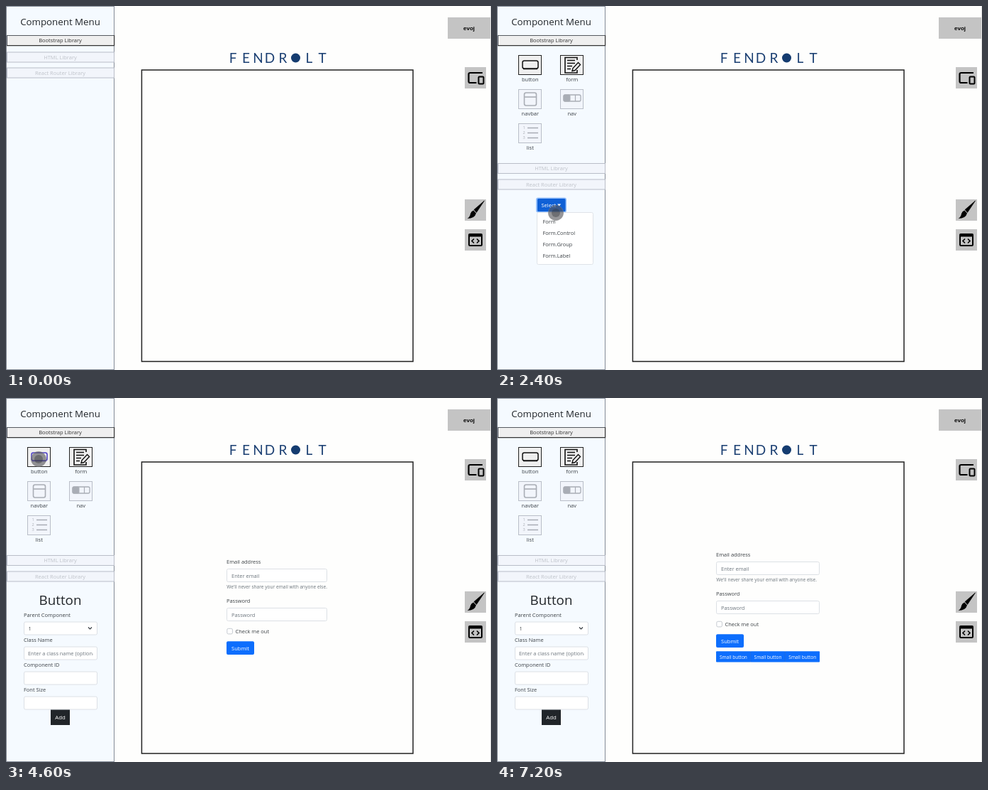
These frames come from a looping animation (684 by 512 pixels, 8 s). An HTML page:

```html
<!DOCTYPE html>
<html lang="en">
<head>
<meta charset="utf-8">
<title>Component builder</title>
<style>
  html, body { margin: 0; width: 100%; height: 100%; overflow: hidden; background: #fefefd; }
  svg { display: block; width: 684px; height: 512px; }
  text { font-family: "Open Sans", "Noto Sans", sans-serif; white-space: pre; }
</style>
</head>
<body>
<svg id="stage" viewBox="0 0 684 512" xmlns="http://www.w3.org/2000/svg">
  <defs><clipPath id="field"><rect x="26" y="349" width="96.5" height="19"/></clipPath></defs>
  <g id="fixed"></g>
  <g id="live"></g>
</svg>
<script>
const LOOP = 8000, STEP = 200;
const INK = '#212529', PALE = '#bfc3ca', VIOLET = '#4a3cc4', BLUE = '#0d6efd';

const attrs = o => Object.entries(o).map(([k, v]) => `${k}="${v}"`).join(' ');
const rect = (x, y, width, height, fill, stroke = 'none', more = {}) =>
  `<rect ${attrs({ x, y, width, height, fill, stroke, ...more })}/>`;
const path = (d, stroke, w = 1, fill = 'none') =>
  `<path ${attrs({ d, stroke, 'stroke-width': w, fill })}/>`;

// y is the middle of the capitals
const text = (s, x, y, size = 7.45, fill = '#3b4045', more = {}) =>
  `<text ${attrs({ x, y: y + size * 0.36, 'font-size': size, fill, ...more })}>${s}</text>`;
const mid = (s, x, y, size, fill, more = {}) =>
  text(s, x, y, size, fill, { 'text-anchor': 'middle', ...more });

function bar(label, y, on, hot) {
  const frame = rect(1.5, y + 0.5, 151, 14, on ? '#efefef' : '#f2f5fb', on ? '#555a60' : '#b9bec8');
  const edge = on ? path(`M1 ${y + 14.7}H152.6V${y}`, '#333', 1.2) : '';
  return frame + edge + mid(label, 76.5, y + 7.5, 7.5, hot ? VIOLET : on ? '#333' : PALE);
}

const icons = {
  button: c => rect(36, 77, 22, 11, 'none', c, { rx: 2.5, 'stroke-width': 1.5 }) +
    path('M37 88.6H57', c, 1.3),
  form: c => path('M113 76V72.5H96V94H113V90', c, 1.6) +
    path('M99 76.5H110M99 80.5H110M99 84.5H106M99 88.5H104', c, 1.4) +
    path('M106 91.5L107 87.5L114.5 79.5L117.5 82.5L110 90.5Z', c, 1.4, '#efefef'),
  navbar: c => rect(38.5, 122, 17, 18, 'none', c, { rx: 2.5, 'stroke-width': 1.6 }) +
    path('M38.5 128H55.5', c, 1.6),
  nav: c => rect(94, 125, 24, 9, 'none', c, { rx: 2, 'stroke-width': 1.3 }) +
    rect(94, 125, 9, 9, c, c, { rx: 1.5 }) + path('M110.5 125V134', c, 1.2),
  list: c => path('M43 171.5H58M43 178.5H58M43 185.5H58', c, 1.5) +
    [1, 2, 3].map(n => mid(n, 38, 164.5 + 7 * n, 5.5, c)).join('')
};

function tile(name, x, y, on, color) {
  return rect(x + 0.5, y + 0.5, 32, 27, on ? '#efefef' : '#f2f5fb', on ? '#222' : '#b9bec8') +
    icons[name](color) + mid(name, x + 16.8, y + 34, 7.5);
}

function tiles(hot) {
  return tile('button', 30, 69, true, hot === 'button' ? VIOLET : '#111') +
    tile('form', 89, 69, true, hot === 'form' ? VIOLET : '#111') +
    tile('navbar', 30, 117, false, '#a9adb5') +
    tile('nav', 89, 117, false, '#a9adb5') +
    tile('list', 30, 165, false, '#a9adb5');
}

const input = (x, y, w) => rect(x + 0.5, y + 0.5, w - 1, 18, '#fff', '#dce0e5', { rx: 2 });
const picker = (x, y, w) => input(x, y, w) + text('1', x + 6.5, y + 9.5) +
  path(`M${x + w - 13} ${y + 8}l2.5 2.5l2.5 -2.5`, '#343a40', 1.2);
const addButton = y => rect(63, y, 27, 21.5, INK) +
  mid('Add', 76.5, y + 10.7, 7.8, '#fff', { 'font-weight': 500 });

function selectButton() {
  return rect(55, 269.5, 43, 21, '#8fbcfb', 'none', { rx: 3 }) +
    rect(57, 271, 39.5, 18, '#0f60d6', 'none', { rx: 1.5 }) +
    text('Select', 62.5, 280, 7.5, '#fff', { 'font-weight': 500 }) +
    path('M85 278.5h5.4l-2.7 2.8z', 'none', 0, '#fff');
}

function dropdown() {
  return rect(56.5, 290.5, 79, 73, '#fff', '#dfe3e8', { rx: 2 }) +
    ['Form', 'Form.Control', 'Form.Group', 'Form.Label']
      .map((s, i) => text(s, 64.5, 303 + 16 * i)).join('');
}

function formPanel() {
  return mid('Form Component', 76.5, 307, 7.35, INK, { 'font-weight': 600 }) +
    mid('Parent Component', 76.5, 322) + picker(43, 331.5, 67) + addButton(350.3);
}

function buttonPanel() {
  const labels = ['Parent Component', 'Class Name', 'Component ID', 'Font Size'];
  const rows = labels.map((s, i) => text(s, 25, 305 + 35 * i) +
    (i ? input : picker)(25, 314.5 + 35 * i, 104)).join('');
  return mid('Button', 76.5, 284, 18.8, INK, { 'font-weight': 500 }) + rows +
    text('Enter a class name (optional)', 31, 359, 7.4, '#6c757d', { 'clip-path': 'url(#field)' }) +
    addButton(438.5);
}

function loginForm(count) {
  const x = count > 2 ? 309 : 311, w = count > 2 ? 146 : 142, y = count ? -10 : 0;
  let s = text('Email address', x, 230 + y) + input(x, 240 + y, w) +
    text('Enter email', x + 7, 250 + y, 7.45, '#6c757d') +
    text("We'll never share your email with anyone else.", x + 0.3, 265.5 + y, 6.6, '#6c757d') +
    text('Password', x, 285 + y) + input(x, 295 + y, w) +
    text('Password', x + 7, 305 + y, 7.45, '#6c757d') +
    rect(x + 0.8, 324.3 + y, 7.6, 7.6, '#fff', '#c5cad0', { rx: 1.8 }) +
    text('Check me out', x + 12.5, 328 + y) +
    rect(x, 342.3 + y, 39, 18.6, BLUE, 'none', { rx: 2 }) +
    mid('Submit', x + 19.5, 352 + y, 7.5, '#fff', { 'font-weight': 500 });
  for (let i = 0; i < count; i++) {
    const bx = x + 48.7 * i;
    s += rect(bx, 356.3, 48.7, 15.2, BLUE, 'none', { rx: 1 }) +
      mid('Small button', bx + 24.4, 364.3, 6.55, '#fff', { 'font-weight': 500 });
    if (i) s += path(`M${bx} 356.3v15.2`, '#0b5fdc', 0.8);
  }
  return s;
}

function shell() {
  const glyphs = { 'font-family': 'Lato, sans-serif', style: 'font-family:Lato,sans-serif' };
  const box = y => rect(647, y, 30, 30, '#c4c4c4');
  return rect(0, 0, 684, 512, '#fefefd') + path('M683.5 0V512', '#e3e3e3') +
    rect(0.5, 0.5, 152, 511, '#f5faff', '#848b96') +
    mid('Component Menu', 76.5, 22, 13.3, INK, { 'font-weight': 500 }) +
    text('FENDRLT', '320 338.5 355.5 372 390.5 427.5 446', 73, 19, '#1c4073',
      { 'text-anchor': 'middle', ...glyphs }) +
    '<circle cx="408.5" cy="73" r="6.5" fill="#153c70"/>' +
    rect(191.4, 90, 382.6, 410, 'none', '#222', { 'stroke-width': 1.5 }) +
    rect(623, 16, 60, 30, '#c4c4c4') +
    mid('evoj', 653, 31, 8, '#000', { 'font-weight': 700, style: 'font-family:"Liberation Sans",sans-serif'.replace(/"/g, "'") }) +
    box(86) + box(272) + box(314) +
    path('M672 94H654.5Q652.5 94 652.5 96V106Q652.5 108 654.5 108H663.5', '#000', 2.2) +
    rect(666.5, 99.5, 7, 10, 'none', '#000', { rx: 1, 'stroke-width': 2 }) +
    path('M674.5 274L660 286.5L663.5 290.5Z', '#000', 0.6, '#000') +
    path('M659.3 287.5L663 291.5Q661 299 650.5 299Q654.5 296.5 655 292Q656 288.5 659.3 287.5Z', 'none', 0, '#000') +
    rect(653, 321, 18, 16, 'none', '#000', { rx: 1.5, 'stroke-width': 2 }) +
    rect(652.5, 320.5, 19, 4, '#000') +
    path('M660 327.5L657 330.5L660 333.5M664 327.5L667 330.5L664 333.5', '#000', 1.6);
}

// time, x, y
const track = [
  [200, 653, 280], [800, 80, 52], [1000, 66, 47], [1200, 68, 55], [1400, 58, 76],
  [1600, 106, 84], [1800, 98, 170], [2000, 82, 276], [2400, 83, 291], [2600, 79, 300],
  [2800, 76, 305], [3000, 84, 340], [3400, 83, 360], [3600, 150, 395], [3800, 329, 350],
  [4000, 260, 260], [4400, 60, 96], [4600, 46, 86], [4800, 46, 86], [5000, 68, 230],
  [5200, 103, 410], [5400, 79, 454], [7200, 79, 454]
];

function pointer(t) {
  const i = track.findIndex(p => p[0] > t);
  if (i < 1) return '';
  const [a, b] = [track[i - 1], track[i]], f = (t - a[0]) / (b[0] - a[0]);
  const cx = a[1] + (b[1] - a[1]) * f, cy = a[2] + (b[2] - a[2]) * f;
  return `<circle cx="${cx}" cy="${cy}" r="10.7" fill="#55565a" fill-opacity=".62" stroke="#888" stroke-opacity=".45"/>` +
    `<circle cx="${cx}" cy="${cy}" r="6" fill="#33343a" fill-opacity=".4"/>`;
}

function scene(t) {
  const within = (a, b) => t >= a && t < b;
  const open = t >= 1000;
  let s = bar('Bootstrap Library', 41, true, within(800, 1400)) +
    bar('HTML Library', open ? 221 : 64.5, false) +
    bar('React Router Library', open ? 243.5 : 86.5, false);
  if (open) s += tiles(within(4400, 6000) ? 'button' : within(1600, 2000) ? 'form' : '');
  if (within(1800, 4600)) s += selectButton();
  if (within(2200, 2800)) s += dropdown();
  if (within(2800, 4600)) s += formPanel();
  if (t >= 4600) s += buttonPanel();
  if (t >= 3600) s += loginForm([6000, 6600, 7200].filter(m => t >= m).length);
  return s + pointer(t);
}

document.getElementById('fixed').innerHTML = shell();
const live = document.getElementById('live');
const start = performance.now();
let shown = -1;

function draw(now) {
  const t = Math.floor((Math.max(0, now - start) % LOOP) / STEP) * STEP;
  if (t !== shown) {
    live.innerHTML = scene(t);
    shown = t;
  }
  requestAnimationFrame(draw);
}
draw(start);
</script>
</body>
</html>
```
